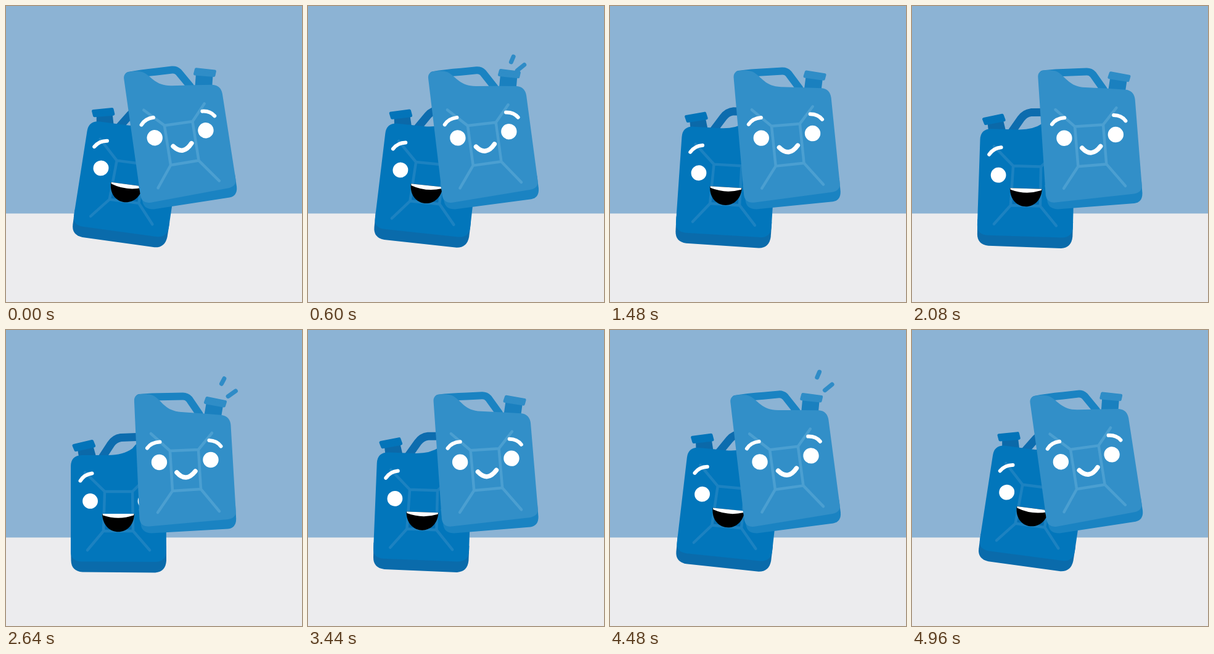
Recreate the animation shown at these times as an HTML page. Size 480 px wide and 480 px high, loop 5000 ms.

```html
<!DOCTYPE html>
<html lang="en">
<head>
<meta charset="utf-8">
<title>Rocking canisters</title>
<style>
  html, body { margin: 0; width: 100%; height: 100%; overflow: hidden; background: #8cb3d4; }
  svg { display: block; width: 100%; height: 100%; }
  .line { fill: none; stroke-linecap: round; stroke-linejoin: round; }
  .face { stroke: #fff; }
  .cap { stroke-width: 5; stroke-linejoin: round; }
</style>
</head>
<body>
<svg viewBox="0 0 480 480">
  <rect width="480" height="480" fill="#8cb3d4"/>
  <rect y="336.500" width="480" height="144" fill="#ececee"/>

  <g id="rear">
    <path class="line" d="M155 208L170 185Q176 176 186 174.500L225 173" stroke="#0d6cae" stroke-width="13"/>
    <path d="M116 193L141 187L146 205L118 206Z" fill="#0b69a9"/>
    <path class="cap" d="M110 187.500L139.500 180.500L142.500 188L113 194.500Z" fill="#0374b9" stroke="#0374b9"/>
    <path d="M105 350H260V374Q259 392 242 393.500L124 392.500Q106 391 105.500 374Z" fill="#0a6bab"/>
    <path d="M105 221Q105 203.500 123 203L165 203Q190 203 205 192Q220 172 240 172Q258 172 259 190L260 358Q260 376 242 376L122 375.500Q105 375 105 359Z" fill="#0276bb"/>
    <path d="M160 308H205V326H159Z" fill="#066fb2"/>
    <path class="line" d="M160 262H205L206 326H158ZL128 231M205 262L236 231M158 326L132 357M206 326L233 357" stroke="#1c82c1" stroke-width="4.500"/>
    <circle cx="136.500" cy="277.500" r="12.400" fill="#fff"/>
    <circle cx="226" cy="277.500" r="12.400" fill="#fff"/>
    <path class="line face" d="M120.500 244.500Q127 234 139.500 232.500" stroke-width="6"/>
    <path d="M156 298C157 337 207 337 208 298Z" fill="#000"/>
    <path d="M156.500 298H207.500L207 300.500Q182 309 157 300.500Z" fill="#fff"/>
  </g>

  <g id="front">
    <path class="line" d="M216 110Q235 108 262 108L287 107.500Q293 107.500 297 112L314 137" stroke="#1a83c2" stroke-width="12"/>
    <path d="M325 117L352 123L349 141L321.500 138Z" fill="#1a80bf"/>
    <path class="cap" d="M326 110.500L355.500 116.500L353.500 123L323.500 117.500Z" fill="#2f8dc7" stroke="#2f8dc7"/>
    <path d="M215 290L372 285L373.200 306Q373.200 321 360 322.500L236 329.500Q221 329 219 317Z" fill="#1a83c2"/>
    <path d="M208 116Q207 105 218 104Q232 103 240 107C254 116 258 131 284 133L320 135.500L350 138Q363 140 364.500 154L372.700 294Q373 305 360 307L232 318.500Q218 319 216.500 306Z" fill="#328fc8"/>
    <path class="line" d="M266 196L312 194L316 258L270 261ZL235 168M312 194L334 167M270 261L246 296M316 258L346 294" stroke="#4b9fd1" stroke-width="4.500"/>
    <circle cx="248.500" cy="214.500" r="12.700" fill="#fff"/>
    <circle cx="332" cy="210.500" r="12.700" fill="#fff"/>
    <path class="line face" d="M229 191.500Q236 182 249.500 181.500M329.500 179Q342 179.500 348.500 188.500" stroke-width="6"/>
    <path class="line face" d="M277 231Q292 248 307 229" stroke-width="7.500"/>
    <g id="drops" class="line" stroke="#2f8cc7">
      <line/><line/>
    </g>
  </g>
</svg>
<script>
  const LOOP = 5000, PEAK = 2780;
  const BURSTS = [490, 2240, 3980], BURST_LENGTH = 720;
  const rear = document.getElementById("rear");
  const front = document.getElementById("front");
  const drops = document.getElementById("drops");

  // Centre, direction and full length of each drop.
  const dropShapes = [
    { x: 351.5, y: 83.5, dx: 0.46, dy: -0.89, length: 9.5 },
    { x: 366, y: 103.5, dx: 0.82, dy: -0.57, length: 15 }
  ];

  function drawDrops(time) {
    const start = BURSTS.find(s => time >= s && time < s + BURST_LENGTH);
    drops.style.display = start === undefined ? "none" : "";
    if (start === undefined) return;
    const age = time - start;
    const size = Math.min(1, 0.55 + age / 250, (BURST_LENGTH - age) / 150);
    const travel = 1.3 * Math.sqrt(age) - 25.5;
    drops.setAttribute("stroke-width", 7 * size);
    dropShapes.forEach((drop, i) => {
      const shift = travel * (i ? 0.75 : 1);
      const line = drops.children[i];
      [-1, 1].forEach((side, end) => {
        const along = shift + side * drop.length * size / 2;
        line.setAttribute("x" + (end + 1), drop.x + drop.dx * along);
        line.setAttribute("y" + (end + 1), drop.y + drop.dy * along);
      });
    });
  }

  // Tilts a group around a point, with a little extra lean.
  function rock(group, x, y, angle, lean) {
    group.setAttribute("transform",
      `translate(${x} ${y}) rotate(${angle}) skewX(${lean}) translate(${-x} ${-y})`);
  }

  function draw(now) {
    const time = now % LOOP;
    const swing = 1.05 * (time < PEAK ? time / PEAK : (LOOP - time) / (LOOP - PEAK));
    rock(rear, 258, 384, 7.5 * (1 - swing), -1.4 * (1 - swing));
    rock(front, 237, 290, -5.5 * (1 - swing), 0);
    drawDrops(time);
  }

  const begin = performance.now();
  function tick() {
    draw(performance.now() - begin);
    requestAnimationFrame(tick);
  }
  tick();
</script>
</body>
</html>
```
